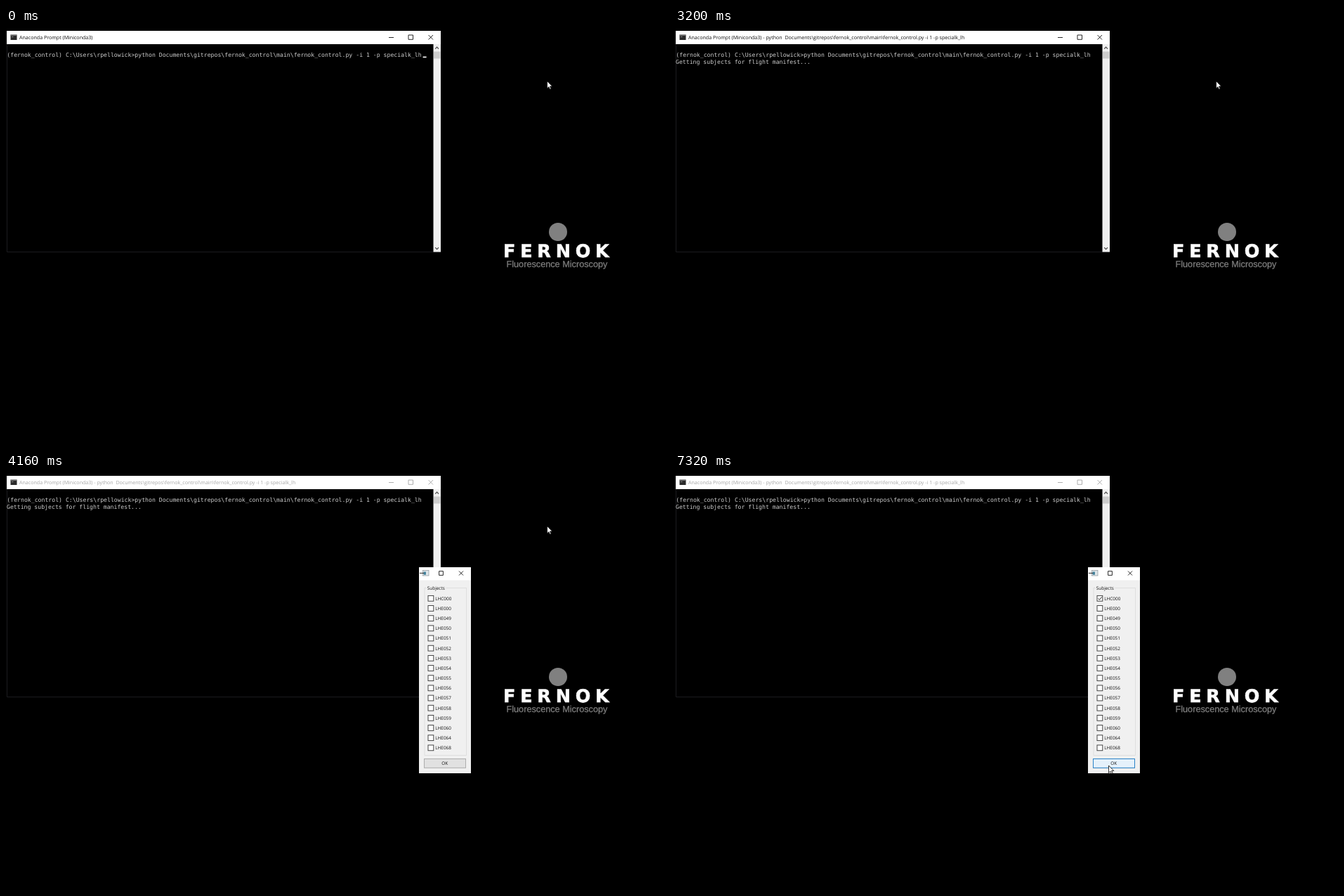
Write an HTML page that moves like this. It is 944x593 px and loops after 8000 ms.

```html
<!DOCTYPE html>
<html lang="en">
<head>
<meta charset="utf-8">
<title>Prompt and subject dialog</title>
<style>
  html, body { margin: 0; width: 100%; height: 100%; overflow: hidden; background: #000; }
  svg { display: block; width: 944px; height: 593px; }
  text { white-space: pre; text-rendering: geometricPrecision; }
  .ui { font-family: "Open Sans", "Noto Sans", sans-serif; }
  .title { font-size: 7.1px; }
  .label { font-size: 6.4px; fill: #111; }
  .mono { font: 8.19px "DejaVu Sans Mono", monospace; fill: #ccc; }
  .line { fill: none; stroke: currentColor; stroke-width: .9; }
  #console { color: #111; }
  #console.idle { color: #a5a5a5; }
  #caption { fill: currentColor; }
</style>
</head>
<body>
<svg viewBox="0 0 944 593">
  <rect width="944" height="593"/>

  <g id="brand">
    <circle cx="786" cy="290" r="13" fill="#808080"/>
    <text x="708" y="325.5" fill="#fff" stroke="#fff" stroke-width=".6" font-family="DejaVu Sans, sans-serif" font-weight="700" font-size="25.4" letter-spacing="6.8">FERNOK</text>
    <text x="712.5" y="340" fill="#808080" stroke="#808080" stroke-width=".25" font-family="Liberation Sans, Arial, sans-serif" font-size="12.7">Fluorescence Microscopy</text>
  </g>

  <g id="console">
    <path d="M1.5 23V318.5H619" fill="none" stroke="#222228" stroke-width=".8"/>
    <rect x="1" y="4" width="618" height="19" fill="#fff"/>
    <rect x="6.5" y="9.5" width="9" height="7.5" fill="#2b2b2b"/>
    <path d="M6.5 10.2H15.5" stroke="#8a8a8a" stroke-width="1.3"/>
    <path d="M8 12.6H10.5" stroke="#aaa" stroke-width=".7"/>
    <text id="caption" class="ui title" x="19" y="15.8"></text>
    <path class="line" d="M545 13.5H552M573 10H579.5V16.3H573ZM601.5 10L608 16.5M608 10L601.5 16.5"/>
    <rect x="608.5" y="23" width="10.5" height="295.5" fill="#f0f0f0"/>
    <rect x="609" y="33.5" width="9.5" height="10" fill="#cdcdcd"/>
    <path d="M611.2 29.6L613.6 27.2 616 29.6M611.2 312.2L613.6 314.6 616 312.2" fill="none" stroke="#444" stroke-width="1.2"/>
    <text id="input" class="mono" x="1.3" y="40.8"></text>
    <text id="output" class="mono" x="1" y="50.6">Getting subjects for flight manifest...</text>
    <rect id="caret" width="5" height="1.8" fill="#eee"/>
  </g>

  <g id="dialog">
    <rect x="588" y="134" width="74" height="293" fill="#f0f0f0"/>
    <rect x="588" y="134" width="74" height="18.5" fill="#fff"/>
    <rect x="593.5" y="138.6" width="8.5" height="7.4" fill="#dfe6ea" stroke="#8a9298" stroke-width=".7"/>
    <rect x="594.7" y="140.5" width="3.2" height="4.2" fill="#3f7f9a"/>
    <path class="line" color="#111" d="M589 142.4H595M616.6 139.6H622.4V145.4H616.6ZM645 139.5L651 145.5M651 139.5L645 145.5"/>
    <rect x="596" y="163.5" width="59.5" height="238" fill="none" stroke="#dadada" stroke-width=".8"/>
    <rect x="599" y="160" width="27.5" height="7" fill="#f0f0f0"/>
    <text class="ui label" x="599.8" y="165.5">Subjects</text>
    <g id="list"></g>
    <path id="tick" d="M602.6 178.4L604.4 180.3 607.6 176.3" fill="none" stroke="#222" stroke-width="1"/>
    <rect x="595.5" y="406.5" width="59" height="12.8" fill="#e1e1e1" stroke="#adadad"/>
    <rect id="hover" x="595.5" y="406.5" width="59" height="12.8" fill="#e5f1fb" stroke="#2a83c8"/>
    <text class="ui label" x="624.7" y="415.4" text-anchor="middle">OK</text>
  </g>

  <path id="mouse" d="M0 0V10.4L2.4 8.2 4 11.8 5.7 11 4.1 7.5H7.3Z" fill="#fff" stroke="#000" stroke-width=".8"/>
</svg>
<script>
const $ = id => document.getElementById(id);
const LOOP = 8000, STEP = 40, BLINK = 530, BLINK_AT = 480;
const ENTER = 2520, PRINT = 3160, OPEN = 3240, OPEN_MS = 180;
const APP = 'Anaconda Prompt (Miniconda3)';
const PATH = 'Documents\\gitrepos\\fernok_control\\main\\fernok_control.py -i 1 -p specialk_lh';

// Pointer stops: time, x, y
const route = [
  [4560, 770.5, 75.5], [4760, 728, 112], [5000, 650, 164], [5240, 627, 179],
  [5600, 606, 178], [6400, 606, 178], [6700, 613, 255], [7080, 621, 396], [7240, 617.5, 416]
];

const subjects = ['LHC000', 'LHE000'];
for (let n = 49; n <= 60; n++) subjects.push('LHE0' + n);
subjects.push('LHE064', 'LHE068');
$('list').innerHTML = subjects.map((name, i) => {
  const y = 178.3 + i * 14.17;
  return `<rect x="601" y="${y - 3.9}" width="7.8" height="7.8" fill="#fff" stroke="#333" stroke-width=".9"/>
    <text class="ui label" x="611.3" y="${y + 2.4}">${name}</text>`;
}).join('');
$('input').textContent = '(fernok_control) C:\\Users\\rpellowick>python ' + PATH;

const ramp = (t, from, to) => Math.min(1, Math.max(0, (t - from) / (to - from)));

function pointer(t) {
  let [, x, y] = route[0];
  for (let i = 1; i < route.length; i++) {
    const [t0, x0, y0] = route[i - 1], [t1, x1, y1] = route[i];
    const p = ramp(t, t0, t1);
    x += (x1 - x0) * p;
    y += (y1 - y0) * p;
  }
  return [x, y];
}

function draw(t) {
  const entered = t >= ENTER, open = t >= OPEN;
  $('caption').textContent = APP + (entered ? ' - python  ' + PATH : '');
  $('console').setAttribute('class', open ? 'idle' : '');
  $('output').setAttribute('opacity', +(t >= PRINT));

  const lit = Math.floor((t - BLINK_AT) / BLINK) % 2 !== 0;
  $('caret').setAttribute('opacity', +(lit && t < PRINT));
  $('caret').setAttribute('x', entered ? 1.3 : 593.6);
  $('caret').setAttribute('y', entered ? 50.4 : 40.5);

  const p = ramp(t, OPEN, OPEN + OPEN_MS);
  const scale = 1 - .1 * (1 - p) ** 3;
  $('dialog').setAttribute('opacity', Math.min(1, 1.5 * p));
  $('dialog').setAttribute('transform', `translate(625 280.5) scale(${scale}) translate(-625 -280.5)`);
  $('tick').setAttribute('opacity', ramp(t, 5840, 5960));
  $('hover').setAttribute('opacity', ramp(t, 7160, 7320));
  $('mouse').setAttribute('transform', `translate(${pointer(t)})`);
}

function tick() {
  draw(Math.floor(performance.now() % LOOP / STEP) * STEP);
  requestAnimationFrame(tick);
}
tick();
</script>
</body>
</html>
```
